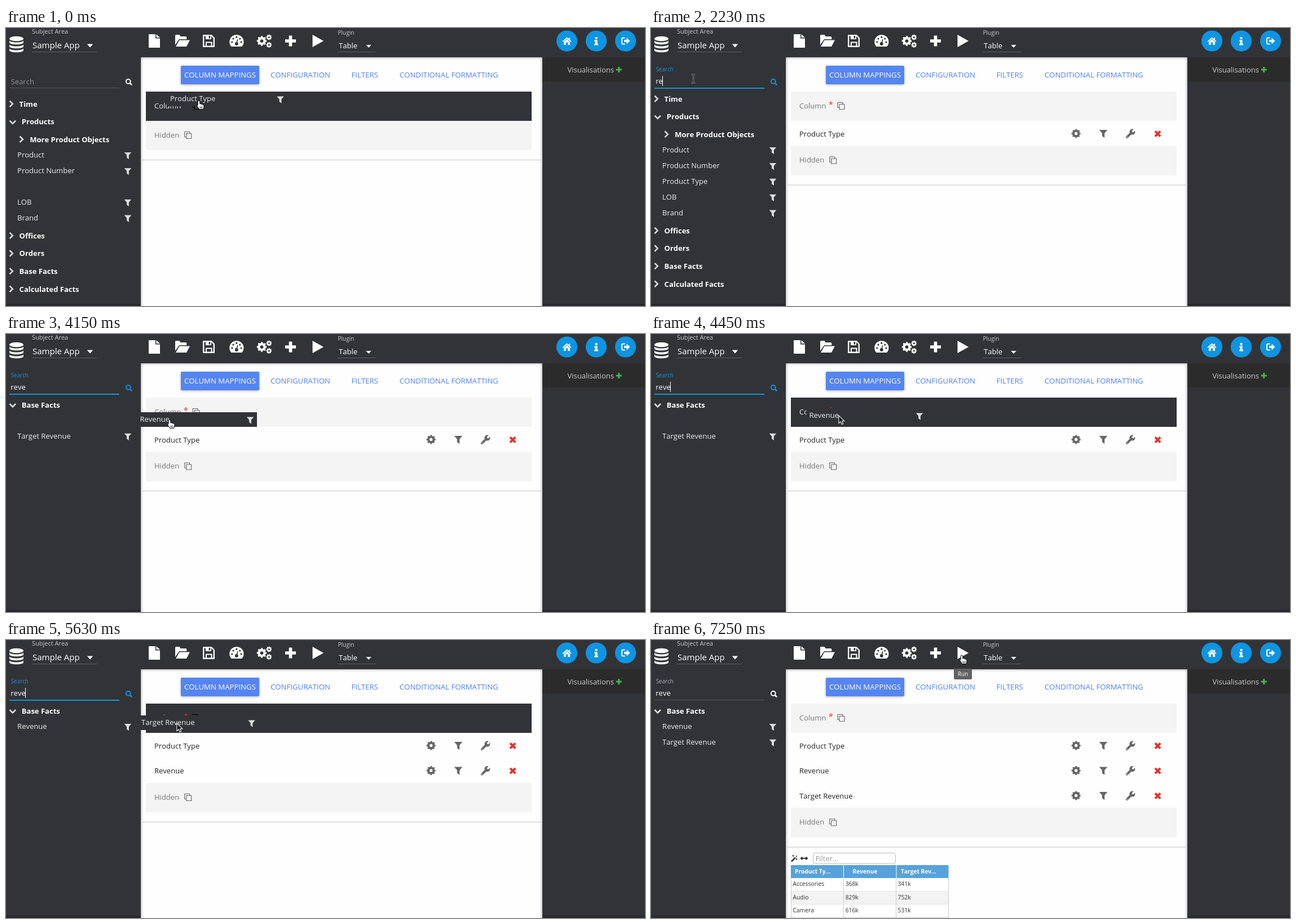
Recreate the animation shown at these times as an HTML page. Size 1133 px wide and 494 px high, loop 8 s.

```html
<!DOCTYPE html>
<html lang="en">
<head>
<meta charset="utf-8">
<title>Report builder</title>
<style>
html, body { margin: 0; width: 100%; height: 100%; overflow: hidden; background: #323337; }
.stage { position: relative; width: 100%; height: 100%; overflow: hidden; contain: strict; }
.panel { position: absolute; left: 239px; top: 52px; width: 712px; height: 460px;
  background: #fefefe; box-shadow: inset 0 0 5px #888; }
svg { position: absolute; left: 0; top: 0; display: block; overflow: hidden; }
text { font-family: "Open Sans", sans-serif; font-kerning: none; white-space: pre; }
.raised { filter: drop-shadow(0 1px 2px rgba(0, 0, 0, .3)); }
</style>
</head>
<body>
<div class="stage">
<div class="panel"></div>
<svg width="1133" height="494" viewBox="0 0 1133 494"><g id="fixed"></g><g id="live"></g></svg>
</div>
<script>
const LOOP = 8000, TICK = 148;
const DARK = '#323337', BLUE = '#1193dc', LINK = '#4f80ee', GREY = '#666', RED = '#e2332d';
const ROW = 44.5;

const text = (x, y, s, fill = '#eee', size = 13.03, extra = '') =>
  `<text x="${x}" y="${y}" fill="${fill}" font-size="${size}" ${extra}>${s}</text>`;
const bold = (x, y, s, fill = '#fff', size = 13.03) => text(x, y, s, fill, size, 'font-weight="700"');
const rect = (x, y, w, h, fill, extra = '') =>
  `<rect x="${x}" y="${y}" width="${w}" height="${h}" fill="${fill}" ${extra}/>`;
const path = (d, fill = '#fff', extra = '') => `<path d="${d}" fill="${fill}" ${extra}/>`;
const line = (d, stroke, w = 1, extra = '') =>
  path(d, 'none', `stroke="${stroke}" stroke-width="${w}" ${extra}`);
const ring = (x, y, r, stroke, w, extra = '') =>
  `<circle cx="${x}" cy="${y}" r="${r}" fill="none" stroke="${stroke}" stroke-width="${w}" ${extra}/>`;
const dot = (x, y, r, fill) => `<circle cx="${x}" cy="${y}" r="${r}" fill="${fill}"/>`;
const at = (x, y, body, extra = '') => `<g transform="translate(${x} ${y}) ${extra}">${body}</g>`;

const gear = (x, y, r, fill) => {
  const tooth = 2 * Math.PI * r * .85 / 16;
  return ring(x, y, r * .58, fill, r * .5) +
    ring(x, y, r * .85, fill, r * .32, `stroke-dasharray="${tooth}" stroke-dashoffset="${tooth / 2}"`);
};
const funnel = (x, y, fill = '#ddd', k = 1) =>
  at(x, y, path('M-6.3-6H6.3L1.9-.9V6.3L-1.9 3.5V-.9Z', fill), `scale(${k})`);
const cross = (x, y, r, w, fill) => line(`M${x - r} ${y}h${2 * r}M${x} ${y - r}v${2 * r}`, fill, w);
const caretDown = (x, y, w, h) => path(`M${x - w / 2} ${y - h / 2}h${w}l${-w / 2} ${h}Z`);
const copyIcon = (x, y, c) =>
  line(`M${x + 3.5} ${y + 3.5}h9v9h-9ZM${x + 3} ${y + 9.5}h-2.5v-9h9v2.5`, c, 1.1, 'stroke-linejoin="round"');
const chevron = (x, y, open) => open
  ? line(`M${x + 1} ${y - 2}l5.3 5.3 5.3-5.3`, '#ddd', 2.6)
  : line(`M${x + 1} ${y - 5.5}l5.3 5.3-5.3 5.3`, '#ddd', 2.6);
const lens = c => ring(216.8, 95, 3.9, c, 2) + line('M219.6 97.8l3.6 3.6', c, 2.5);
const wrench = (x, y) => at(x, y,
  line('M-6.2 6.2L2-2', GREY, 4, 'stroke-linecap="round"') + dot(3.4, -3.4, 5, GREY) +
  line('M3.6-3.600L9-9', '#fefefe', 3.6) + dot(-5.9, 5.9, .8, '#fefefe'));
const remove = (x, y) => line(`M${x - 4.6} ${y - 4.6}l9.2 9.2m0-9.2l-9.2 9.2`, RED, 4);

function toolbar() {
  const disk = y => path(`M6 ${y}v3.5c0 5 25 5 25 0V${y}c0 4.6-25 4.6-25 0Z`);
  const file = path('M253 11h12v7.5h8V35h-20Z') + path('M266.5 11l6.5 6h-6.5Z');
  const folder = path('M300 30V13.5q0-1.5 1.5-1.5h6l2 3h9q1.8 0 1.8 1.8V20H307Z') +
    path('M301 33l6.5-11.5H326L320 33Z');
  const floppy = line('M350.2 13.2h14l4.6 4.6v15h-18.6Z', '#fff', 2.4, 'stroke-linejoin="round"') +
    path('M354 12h10v8h-10Z') + rect(359.6, 14, 2.6, 4.5, DARK) + line('M355 33v-7.5h9.5V33', '#fff', 2);
  const gauge = path('M399.5 33A12.6 12.6 0 1 1 418.2 33Z') +
    [[400.8, 25], [403, 19], [408.8, 16.2], [414.7, 19], [417, 25]].map(([x, y]) => dot(x, y, 1.6, DARK)).join('') +
    dot(408.8, 28, 2.9, DARK) + line('M408.8 28l2-8', DARK, 1.5);
  const gears = gear(453.5, 23, 8.7, '#fff') + gear(466.3, 16.5, 4.9, '#fff') + gear(466.3, 30, 4.9, '#fff');
  return '<ellipse cx="18.5" cy="19" rx="12.5" ry="4.3" fill="#fff"/>' + [22, 29, 36].map(disk).join('') +
    text(46, 10.2, 'Subject Area', '#ccc', 11) + text(47, 36.3, 'Sample App', '#fff', 15) +
    caretDown(149, 31.5, 10.5, 6) + line('M46 42.5H161', '#5d5e62') +
    file + folder + floppy + gauge + gears + cross(504.5, 23, 9.5, 5.6, '#fff') + path('M543.5 12L563 23 543.5 34Z') +
    text(588.5, 11.5, 'Plugin', '#ccc', 10) + text(590, 36.3, 'Table', '#fff') +
    caretDown(643, 32.5, 9.5, 5) + line('M588 42.5H656', '#5d5e62');
}

function corner() {
  const home = path('M986.5 23.5L994.5 16.5 1002.5 23.5 1001.3 24.8 994.5 19 987.7 24.8Z') +
    path('M989 24.7L994.5 20 1000 24.7V30H996.2V25.5H992.8V30H989Z') + rect(998, 17.2, 2, 4, '#fff');
  const info = rect(1044.6, 16, 4, 3.6, '#fff') + path('M1043.3 21.2h5.3v6.8h1.4v2.5h-7v-2.5h1.5v-4.3h-1.2Z');
  const exit = line('M1097.5 17.5h-3.5q-2 0-2 2v7q0 2 2 2h3.5', '#fff', 2) +
    path('M1096 21h4.5v-3.8l6 5.8-6 5.8V25H1096Z');
  return [994.5, 1046.5, 1098.5].map(x => dot(x, 23, 18.6, '#0d94e2')).join('') + home + info + exit +
    rect(951, 52, 182, 43, '#2b2b2c') + text(995.5, 78.8, 'Visualisations', '#ccc') +
    cross(1086.7, 74, 5, 2.9, '#44b649');
}

function tabs() {
  const tab = (x, s, fill = LINK) => text(x, 88.2, s, fill, 13.2);
  return rect(310, 67, 139, 33, '#5585f1', 'rx="2" class="raised"') + tab(316, 'COLUMN MAPPINGS', '#fff') +
    tab(469, 'CONFIGURATION') + tab(612.5, 'FILTERS') + tab(697.8, 'CONDITIONAL FORMATTING');
}

// Pointer stops: tick, x, y of the tip, shape
const STOPS = [
  [0, 342, 129, 'hand'], [1, 338, 131, 'arrow'], [2, 290, 122, 'arrow'], [3, 190, 100, 'arrow'],
  [4, 105, 80, 'arrow'], [5, 77, 88, 'beam'], [7, 75, 90, 'beam'], [22, 75, 90, 'beam'],
  [23, 75, 122, 'hand'], [24, 74, 154, 'hand'], [25, 84, 154, 'hand'], [28, 290, 152, 'hand'],
  [29, 325, 147, 'arrow'], [30, 333, 145, 'arrow'], [31, 330, 146, 'arrow'], [33, 180, 168, 'arrow'],
  [34, 105, 180, 'hand'], [35, 83, 182, 'hand'], [36, 120, 180, 'hand'], [37, 235, 164, 'arrow'],
  [38, 303, 148, 'arrow'], [39, 307, 146, 'arrow'], [41, 307, 146, 'arrow'], [42, 322, 138, 'arrow'],
  [45, 530, 45, 'arrow'], [46, 562, 28, 'hand'], [47, 551, 27, 'hand'], [54, 551, 27, 'hand']
];
// Dragged rows: first tick, drop tick, label, offset from the pointer
const DRAGS = [
  [0, 1, 'Product Type', -51, -3], [25, 31, 'Revenue', -52.5, 0], [36, 39, 'Target Revenue', -63, -1]
];
const BLINKS = [8, 12, 14, 20, 23, 27, 30, 33, 37, 42];

function pointerAt(n) {
  const i = Math.max(0, STOPS.findLastIndex(s => s[0] <= n));
  const a = STOPS[i], b = STOPS[i + 1] || a;
  const k = b === a ? 0 : (n - a[0]) / (b[0] - a[0]);
  return { x: a[1] + (b[1] - a[1]) * k, y: a[2] + (b[2] - a[2]) * k, shape: a[3] };
}

const BEAM = 'M-3.5-7.5Q0-7.500 0-5.500 0-7.500 3.500-7.500M0-5.500V5.500M-3.500 7.500Q0 7.500 0 5.500 0 7.500 3.500 7.500M-2 2.500h4';
const SHAPES = {
  arrow: path('M0 0V13.5L3.1 10.7 5.3 15.6 7.7 14.5 5.5 9.7H9.7Z', '#000', 'stroke="#fff" stroke-width="1.1"'),
  hand: path('M-.3 0Q1.6 0 1.8 2V6Q3.5 5 4.5 6.5 6 5.7 6.8 7.2 9 6.8 9 9V11Q9 13 7.5 15.5H.7Q-1 12.5-3.2 10-4 8.2-2 8L-1.8 2Q-1.7 0-.3 0Z',
    '#fff', 'stroke="#000" stroke-width="1"') + line('M2 10.5v3.5m2-3.5v3.5m2-3.5v3.5', '#000', .8),
  beam: line(BEAM, '#8c8c8e', 2.6) + line(BEAM, '#1c1c1e', 1)
};

function searchBox(n) {
  const typed = 'reve'.slice(0, Math.max(0, Math.min(4, n - 13)));
  const focused = n >= 8 && n < 48;
  const lift = [.15, .64, .92][n - 8] ?? (n < 8 ? 0 : 1);
  const label = text(8.7, 99.8 - 23.2 * lift, 'Search', focused ? BLUE : n < 8 ? '#8f9093' : '#b0b0b2', 13.03 - 3.13 * lift);
  const half = n === 8 ? 55 : 97.5;
  const rule = focused
    ? rect(103.5 - half, 106, 2 * half, 2, BLUE)
    : line('M6 106.5H201', '#55565a');
  const caretOn = focused && BLINKS.filter(b => b <= n).length % 2 === 1;
  const widths = [0, 5, 12, 19, 26];
  const caret = caretOn ? rect(8 + widths[typed.length], 85, 1, 18, '#fff') : '';
  return label + rule + lens(focused ? BLUE : '#fff') + text(8.3, 99.4, typed, '#fff') + caret;
}

function tree(n, held) {
  const leaf = (y, s) => s === held ? '' : text(20.1, y + 4.4, s) + funnel(216, y + 1.4);
  const group = (y, s, open) => chevron(5.5, y, open) + bold(open ? 27.8 : 23.6, y + 4.6, s);
  if (n >= 16) return group(126, 'Base Facts', true) + leaf(153.5, 'Revenue') + leaf(181.3, 'Target Revenue');
  const top = n < 1 ? 135 : 126;
  return group(top, 'Time') + group(top + 31.7, 'Products', true) +
    chevron(23.5, top + 63, false) + bold(42.2, top + 67.6, 'More Product Objects') +
    ['Product', 'Product Number', 'Product Type', 'LOB', 'Brand'].map((s, i) => leaf(top + 90.6 + 27.9 * i, s)).join('') +
    ['Offices', 'Orders', 'Base Facts', 'Calculated Facts'].map((s, i) => group(top + 234.1 + 31.6 * i, s)).join('');
}

function mappings(n, over) {
  const rows = DRAGS.filter(d => n >= d[1]).map(d => d[2]);
  const shift = rows.length * ROW;
  const row = (s, i) => {
    const y = 188 + ROW * i;
    return text(263, y + 4.8, s, '#222') + gear(753.7, y - .5, 8, GREY) + funnel(802, y, GREY, 1.15) +
      wrench(850, y) + remove(898.5, y);
  };
  return rect(248, 113, 684, 52, over ? DARK : '#f4f4f4') +
    text(263, 143, 'Column', over ? '#eee' : '#777') + text(314.8, 141, '*', RED, 15) +
    copyIcon(330.5, 132, over ? '#000' : '#666') + rows.map(row).join('') +
    rect(248, 165 + shift, 684, 52, '#f4f4f4') + text(263, 194.8 + shift, 'Hidden', '#777') +
    copyIcon(316.2, 184 + shift, '#666') + line(`M242 ${234.5 + shift}H949`, '#c4c4c4');
}

function resultTable() {
  const cols = [251.5, 344.7, 437.5];
  const data = [['Accessories', '368k', '341k'], ['Audio', '829k', '752k'], ['Camera', '616k', '531k']];
  const body = data.map((r, i) => rect(248, 423 + 23.3 * i, 279, 23.3, i % 2 ? '#f3f3f3' : '#fff') +
    line(`M248 ${446.5 + 23.2 * i}H527.5`, '#ccc') +
    r.map((s, c) => text(cols[c], 437.3 + 23.3 * i, s, '#333', 10.3)).join('')).join('');
  const head = (x, s) => bold(x, 415.2, s, '#fff', 10.2);
  return line('M249 393.5l7-7', '#222', 2.4) + line('M257 385.5l2-2M252 382v3M250.5 383.5h3M258 388v3M256.5 389.5h3', '#222', 1.1) +
    line('M267 388h9', '#222', 1.8) + path('M264.5 388l4-3.5v7ZM278.5 388l-4-3.5v7Z', '#222') +
    rect(287.5, 378.5, 146, 18.5, '#fff', 'rx="3" stroke="#bbb"') + text(291.5, 392.5, 'Filter...', '#999') +
    body + line('M248.5 423V494M341.5 423V494M434.5 423V494M527.5 423V494', '#ccc') +
    rect(248, 400, 279.5, 23, '#58a1da') + line('M341.5 400v23M435 400v23', '#fff') +
    head(255, 'Product Ty...') + head(357.5, 'Revenue') + head(443, 'Target Rev...');
}

function scene(n) {
  const p = pointerAt(n);
  const drag = DRAGS.find(d => n >= d[0] && n < d[1]);
  let ghost = '', over = false;
  if (drag) {
    const x = p.x + drag[3], y = p.y + drag[4];
    over = p.x > 300;
    ghost = rect(x - 4.5, y - 13, 212, 26, DARK) + text(x, y + 4.4, drag[2]) + funnel(x + 195.5, y + 1.4);
  }
  const tip = n >= 47 ? rect(537, 51, 32, 19, '#616161', 'rx="2"') + text(553, 64.2, 'Run', '#fff', 10, 'text-anchor="middle"') : '';
  return searchBox(n) + tree(n, drag && drag[2]) + mappings(n, over) + (n >= 49 ? resultTable() : '') +
    ghost + tip + at(p.x, p.y, SHAPES[p.shape]);
}

document.getElementById('fixed').innerHTML = toolbar() + corner() + tabs() +
  rect(0, 490, 239, 4, '#29292d') + rect(951, 490, 182, 4, '#29292d');

const live = document.getElementById('live');
const start = performance.now();
let shown = -1;
function frame() {
  const n = Math.floor(((performance.now() - start) % LOOP + 6) / TICK);
  if (n !== shown) live.innerHTML = scene(shown = n);
  requestAnimationFrame(frame);
}
frame();
</script>
</body>
</html>
```
